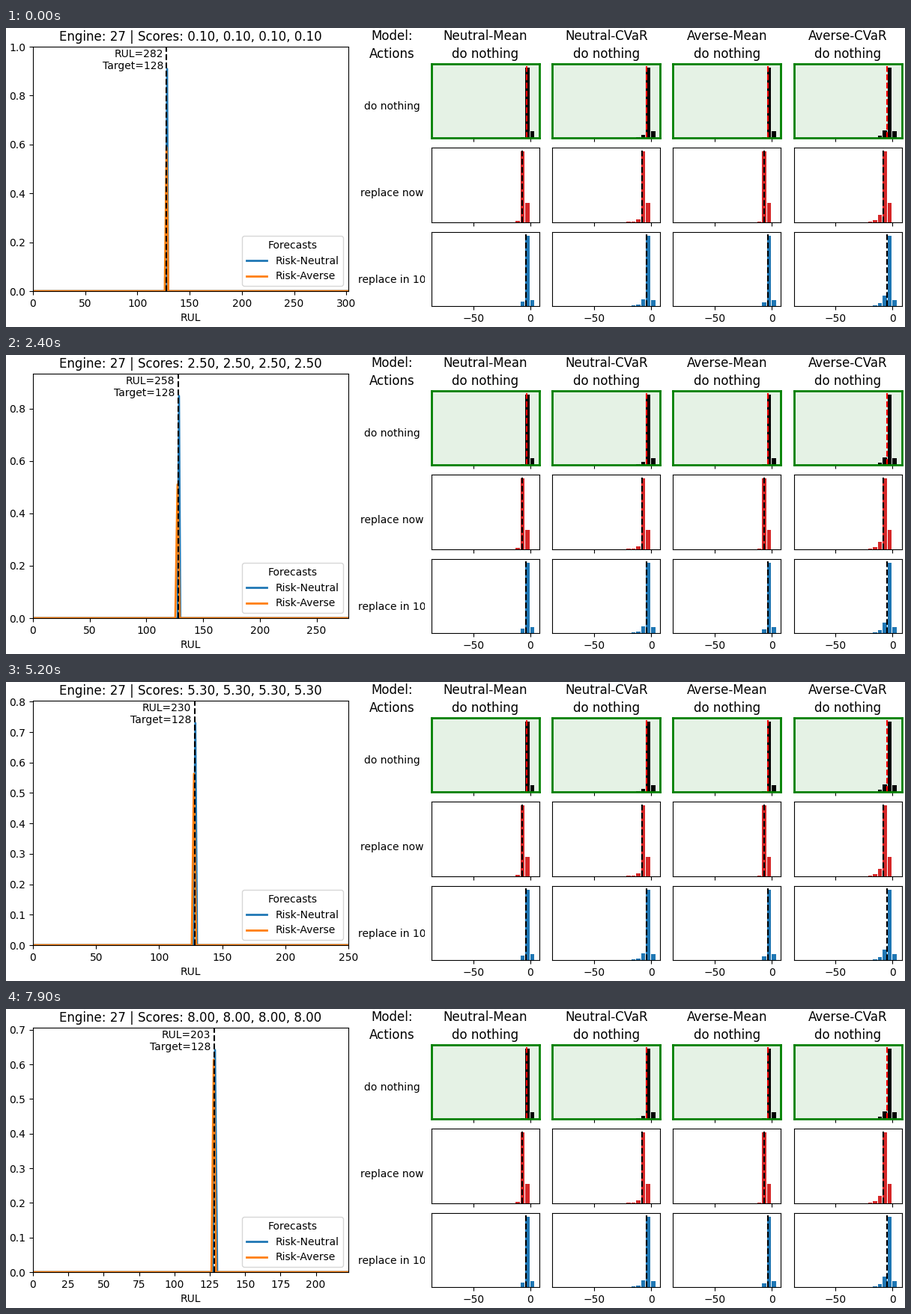
Recreate the animation shown at these times as a matplotlib script. Size 1200x400 px, loop 8 s.

```python
import numpy as np
import matplotlib.pyplot as plt
from matplotlib.animation import FuncAnimation

W, H, DPI = 1200, 400, 100
FRAMES, INTERVAL = 80, 100
START_RUL, TARGET, MARGIN = 282, 128, 20

# Keyframes as (step, value), linear in between.
NEUTRAL_PEAK = [(0, 0.9092), (8, 0.9176), (24, 0.849), (34, 0.7636),
                (46, 0.771), (59, 0.683), (79, 0.642)]
NEUTRAL_MID = [(0, 128.4), (8, 128.7)]
AVERSE_PEAK = [(0, 0.588), (22, 0.507), (79, 0.614)]
AVERSE_MID = [(0, 127.9), (24, 127.4), (79, 127.8)]

# Name and size of the first tail bar, in percent of the tallest bar.
MODELS = [("Neutral-Mean", 2), ("Neutral-CVaR", 4.5),
          ("Averse-Mean", 1), ("Averse-CVaR", 10.5)]

# Label, bar colour, risk line colour, empty bins at the right,
# height of the bar right of the mode, extra tail, mean risk.
ACTIONS = [("do nothing", "black", "red", 0, 10, 0, -3.3),
           ("replace now", "tab:red", "black", 1, 27.5, 0, -7.0),
           ("replace in 10", "tab:blue", "black", 0, 9, 5, -3.5)]
BIN, FIRST_BIN = 4.3, 1.8
TAIL_DECAY = 0.3

fig = plt.figure(figsize=(W / DPI, H / DPI), dpi=DPI, facecolor="white")


def add_axes(left, top, right, bottom):
    """Axes given by pixel edges, y measured from the top."""
    return fig.add_axes([left / W, 1 - bottom / H,
                         (right - left) / W, (bottom - top) / H])


def draw_cell(row, col):
    model, tail = MODELS[col]
    _, bar_color, line_color, skip, side, extra, risk = ACTIONS[row]
    is_cvar = model.endswith("CVaR")

    left, top = 568 + 161.2 * col, 48 + 112.4 * row
    ax = add_axes(left, top, left + 144, top + 99.4)

    tail_bars = (tail + extra) * TAIL_DECAY ** np.arange(3 if is_cvar else 1)
    heights = [side, 100, *tail_bars]
    centers = FIRST_BIN - BIN * (skip + np.arange(len(heights)))
    ax.bar(centers, heights, width=BIN * 0.85, color=bar_color)

    if is_cvar:
        risk -= 0.3 + 0.09 * tail
    ax.axvline(risk, color=line_color, ls="--", lw=1.5)

    ax.set_xlim(-86.5, 8)
    ax.set_ylim(0, 105)
    ax.set_xticks([-50, 0])
    ax.set_yticks([])
    ax.tick_params(labelbottom=row == len(ACTIONS) - 1)
    if row == 0:
        ax.set_title(f"{model}\n{ACTIONS[0][0]}", linespacing=1.4)
        ax.set_facecolor((0, 0.5, 0, 0.1))
        for spine in ax.spines.values():
            spine.set(color="green", linewidth=2)


def draw_labels():
    left, top, right, bottom = 471, 48, 559, 372
    ax = add_axes(left, top, right, bottom)
    ax.set_xlim(left, right)
    ax.set_ylim(bottom, top)
    ax.axis("off")
    ax.set_title("Model:\nActions", linespacing=1.4)
    for i, action in enumerate(ACTIONS):
        ax.text(515.5, 109.5 + 116 * i, action[0], ha="center",
                va="baseline", clip_on=True)


for r in range(len(ACTIONS)):
    for c in range(len(MODELS)):
        draw_cell(r, c)
draw_labels()

main = add_axes(36, 25, 457, 352)
main.set_xlabel("RUL")
neutral, = main.plot([], [], color="tab:blue", lw=2, label="Risk-Neutral")
averse, = main.plot([], [], color="tab:orange", lw=2, label="Risk-Averse")
main.axvline(TARGET, color="black", ls="--", lw=1.5)
main.legend(title="Forecasts", loc="lower right")
title = main.set_title("")
note = main.annotate("", xy=(TARGET, 0.99),
                     xycoords=main.get_xaxis_transform(),
                     xytext=(-3.1, 0), textcoords="offset points",
                     ha="right", va="top")


def set_forecast(line, mid, peak, end):
    # Triangular density of unit area.
    half = 1 / peak
    line.set_data([0, mid - half, mid, mid + half, end], [0, 0, peak, 0, 0])


def update(i):
    def at(keys):
        return np.interp(i, *zip(*keys))

    rul = START_RUL - i
    end = rul + MARGIN
    peak = at(NEUTRAL_PEAK)
    set_forecast(neutral, at(NEUTRAL_MID), peak, end)
    set_forecast(averse, at(AVERSE_MID), at(AVERSE_PEAK), end)
    main.set_xlim(0, end)
    main.set_ylim(0, 1.1 * peak)
    scores = ", ".join([f"{(i + 1) / 10:.2f}"] * len(MODELS))
    title.set_text(f"Engine: 27 | Scores: {scores}")
    note.set_text(f"RUL={rul}\nTarget={TARGET}")
    return neutral, averse, title, note


anim = FuncAnimation(fig, update, frames=FRAMES, interval=INTERVAL,
                     repeat=True, repeat_delay=0, blit=False)
plt.show()
```
